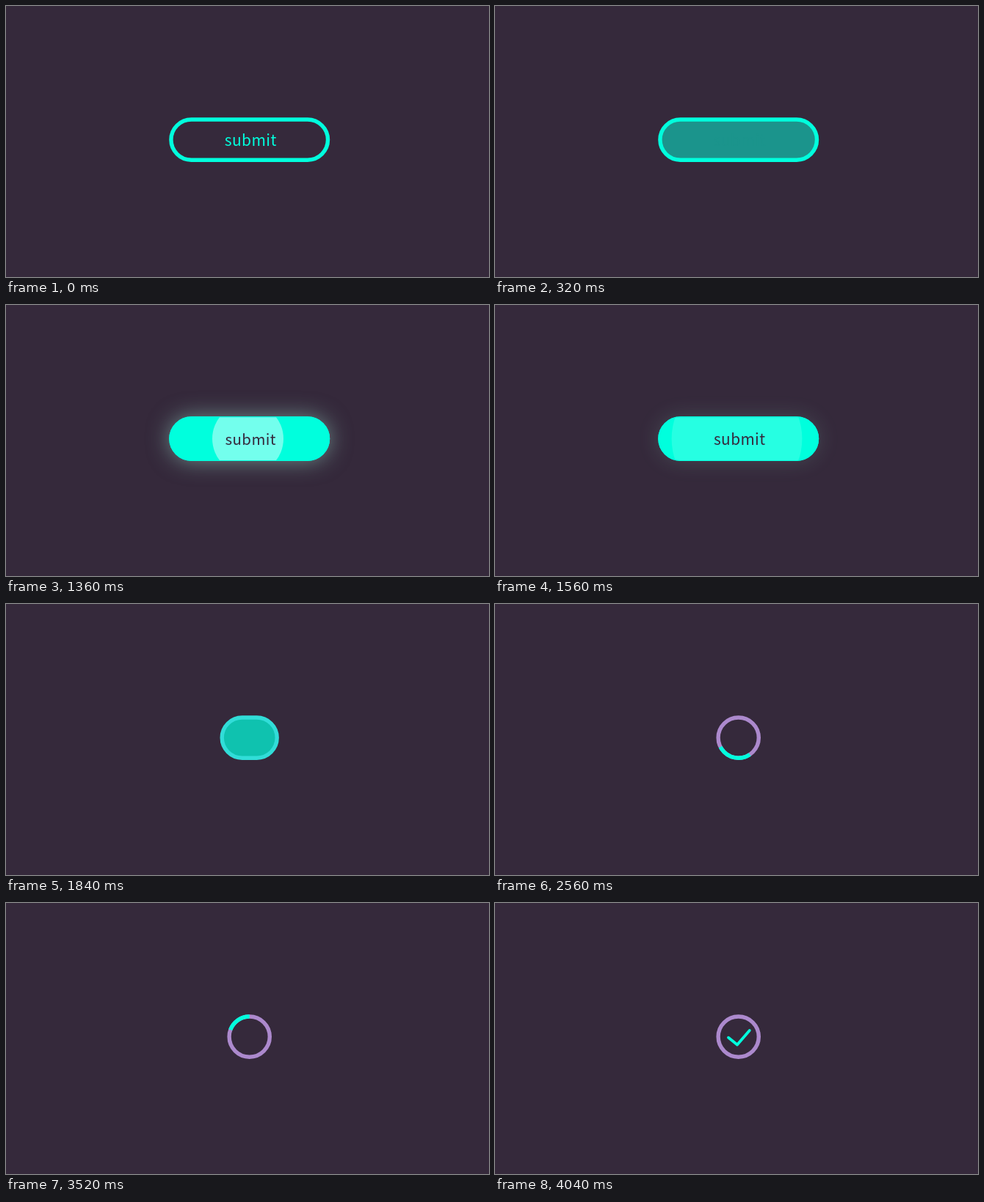
An HTML page with a canvas that plays this animation: 658 by 370 pixels, repeating every 5.04 s.

```html
<!DOCTYPE html>
<html lang="en">
<head>
<meta charset="utf-8">
<title>Submit button</title>
<style>
  html, body { margin: 0; width: 100%; height: 100%; overflow: hidden; background: #35293b; }
  canvas { display: block; }
</style>
</head>
<body>
<canvas id="stage" width="658" height="370"></canvas>
<script>
const ctx = document.getElementById('stage').getContext('2d');
const LOOP = 5040, STEP = 40, TAU = Math.PI * 2;
const CX = 331.7, CY = 182.6, SIZE = 60.6, WIDE = 219, LINE = 5.4;
const BG = [53, 41, 59], MINT = [0, 255, 221], LILAC = [172, 137, 205];

const ramp = (t, from, to) => Math.min(1, Math.max(0, (t - from) / (to - from)));
const ease = p => p < .5 ? 2 * p * p : 1 - 2 * (1 - p) ** 2;
const mix = (a, b, p) => `rgb(${a.map((v, i) => Math.round(v + (b[i] - v) * p))})`;

function pill(width, inset) {
  const h = SIZE - 2 * inset, w = width - 2 * inset;
  ctx.beginPath();
  ctx.roundRect(CX - w / 2, CY - h / 2, w, h, h / 2);
}

function drawButton(t) {
  const fill = ease(ramp(t, 0, 640));
  const press = ease(ramp(t, 1040, 1320)) * (1 - ramp(t, 1400, 1640));
  const width = WIDE + (SIZE - WIDE) * ease(ramp(t, 1600, 1920));
  const fade = ramp(t, 1760, 2040);

  if (press > 0) {
    ctx.save();
    ctx.shadowColor = `rgba(165, 235, 215, ${.5 * press})`;
    ctx.shadowBlur = 30;
    ctx.fillStyle = mix(MINT, MINT, 0);
    pill(width, 0);
    ctx.fill();
    ctx.restore();
  }

  pill(width, LINE / 2);
  ctx.fillStyle = mix(BG, MINT, fill * (1 - fade));
  ctx.fill();
  ctx.strokeStyle = mix(MINT, LILAC, fade);
  ctx.lineWidth = LINE;
  ctx.stroke();

  drawRipple(t, width);
  drawLabel(t, fill, press);
}

function drawRipple(t, width) {
  const alpha = .45 * (1 - ramp(t, 1400, 1640));
  if (t <= 1120 || alpha <= 0) return;
  ctx.save();
  pill(width, 1);
  ctx.clip();
  ctx.fillStyle = `rgba(255, 255, 255, ${alpha})`;
  ctx.beginPath();
  ctx.arc(329.5, CY, 48.5 * (t - 1120) / 240, 0, TAU);
  ctx.fill();
  ctx.restore();
}

function drawLabel(t, fill, press) {
  ctx.save();
  ctx.globalAlpha = 1 - ramp(t, 1600, 1760);
  ctx.translate(333.2, CY);
  ctx.scale(1 - .025 * press, 1 - .025 * press);
  ctx.font = '500 21px "Noto Sans CJK JP", "Noto Sans CJK SC", "Noto Sans CJK", "Noto Sans", sans-serif';
  ctx.letterSpacing = '0.4px';
  ctx.textAlign = 'center';
  ctx.fillStyle = mix(MINT, BG, fill);
  ctx.fillText('submit', 0, 8.4);
  ctx.restore();
}

// Head and tail each make two turns from the top, the tail following later.
function drawSpinner(t) {
  const turn = start => -TAU / 4 + 2 * TAU * ramp(t, start, start + 1371);
  const head = turn(2098), tail = turn(2282);
  if (head <= tail) return;
  ctx.strokeStyle = mix(MINT, MINT, 0);
  ctx.lineWidth = LINE;
  ctx.beginPath();
  ctx.arc(CX, CY, (SIZE - LINE) / 2, tail, head);
  ctx.stroke();
}

function drawCheck(t) {
  const p = ease(ramp(t, 3660, 4040));
  if (p <= 0) return;
  const points = [[318, 183.7], [330, 193.4], [346.8, 174]];
  ctx.save();
  ctx.strokeStyle = mix(MINT, MINT, 0);
  ctx.lineWidth = 3.8;
  ctx.lineCap = ctx.lineJoin = 'round';
  ctx.setLineDash([41.1 * p, 100]);
  ctx.beginPath();
  points.forEach(([x, y]) => ctx.lineTo(x, y));
  ctx.stroke();
  ctx.restore();
}

function frame() {
  const t = Math.floor(performance.now() % LOOP / STEP) * STEP;
  ctx.fillStyle = mix(BG, BG, 0);
  ctx.fillRect(0, 0, 658, 370);
  drawButton(t);
  drawSpinner(t);
  drawCheck(t);
  requestAnimationFrame(frame);
}
frame();
</script>
</body>
</html>
```
